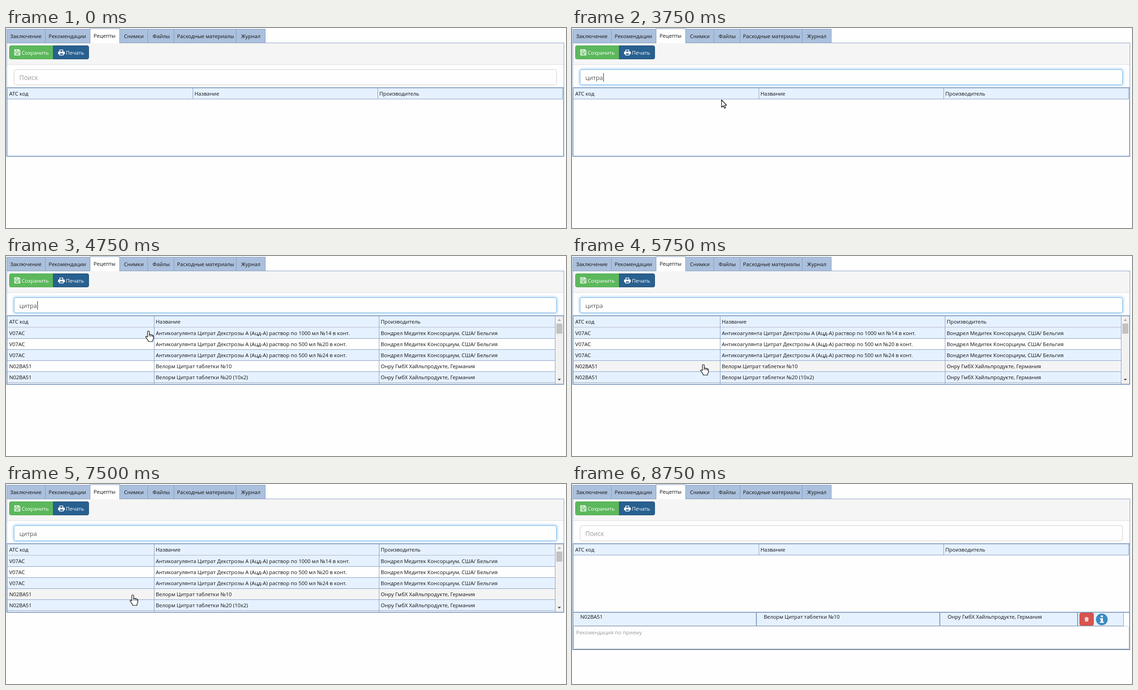
Recreate the animation shown at these times as an HTML page. Size 1215 by 435 pixels, loop 9.25 s.

```html
<!DOCTYPE html>
<html lang="ru">
<head>
<meta charset="utf-8">
<title>Рецепты</title>
<style>
html, body { margin: 0; width: 100%; height: 100%; overflow: hidden; background: #fefefe; }
svg { display: block; width: 1215px; height: 435px; }
text { font-family: "Open Sans", "Noto Sans", sans-serif; white-space: pre; }
</style>
</head>
<body>
<svg id="stage" viewBox="0 0 1215 435"></svg>
<script>
const LOOP = 9250, STEP = 250;
const LINE = '#839dc1', BLUE = '#e6f1ff', WHITE = '#fefefe', HOVER = '#f4f4f4';
const stage = document.getElementById('stage');

function add(parent, tag, attrs, content) {
  const el = document.createElementNS('http://www.w3.org/2000/svg', tag);
  for (const k in attrs) el.setAttribute(k, attrs[k]);
  if (content) el.textContent = content;
  parent.appendChild(el);
  return el;
}
const group = (parent = stage) => add(parent, 'g', {});
const box = (p, x1, y1, x2, y2, fill, extra) =>
  add(p, 'rect', { x: x1, y: y1, width: x2 - x1, height: y2 - y1, fill, ...extra });
const outline = (p, x1, y1, x2, y2, stroke, fill = 'none', rx = 0) =>
  box(p, x1 + .5, y1 + .5, x2 - .5, y2 - .5, fill, { stroke, rx });
const label = (p, x, y, s, size = 11.35, fill = '#111') =>
  add(p, 'text', { x, y, 'font-size': size, fill }, s);
const path = (p, d, fill, extra) => add(p, 'path', { d, fill, ...extra });
const show = (el, on) => el.setAttribute('visibility', on ? 'inherit' : 'hidden');

// Panel, toolbar and tabs
const base = group();
box(base, 2, 33, 1210, 79, '#f5f5f5');
box(base, 2, 79, 1210, 80, '#dddddd');
box(base, 1, 32, 1211, 33, LINE);
box(base, 1, 32, 2, 130, LINE);
box(base, 1210, 32, 1211, 130, LINE);

const tabs = [
  [1, 'Заключение', 9], [85, 'Рекомендации', 92.5], [182, 'Рецепты', 190], [246, 'Снимки', 256],
  [307, 'Файлы', 318], [364, 'Расходные материалы', 371], [499, 'Журнал', 510], [562]
];
tabs.slice(0, -1).forEach(([x, name, tx], i) => {
  const active = i === 2;
  outline(base, x, active ? 1 : 2, tabs[i + 1][0] + 1, 33, LINE, active ? WHITE : '#abc0dc');
  if (active) box(base, x + 1, 32, tabs[i + 1][0], 33, WHITE);
  label(base, tx, active ? 21 : 22, name, 11.25);
});

path(base, 'M11 38.5H102.5V67.5H11Q7.5 67.5 7.5 64V42Q7.5 38.5 11 38.5Z', '#5cb85c', { stroke: '#4cae4c' });
path(base, 'M102.5 38.5H176Q179.5 38.5 179.5 42V64Q179.5 67.5 176 67.5H102.5Z', '#286090', { stroke: '#204d74' });
label(base, 34, 58, 'Сохранить', 11.25, '#fff');
label(base, 130, 58, 'Печать', 11.25, '#fff');
path(base, 'M18.7 47.2H28L30.3 49.5V58.8H18.7ZM21 47V51H27.5V47M21 59V54.2H28V59',
  'none', { stroke: '#fff', 'stroke-width': 1.4 });
box(base, 25, 47, 27, 50, '#fff');
path(base, 'M116 47H124V51H126Q127.5 51 127.5 52.5V57H125V59.5H115.5V57H113V52.5Q113 51 114.5 51H116Z', '#fff');
box(base, 117.5, 48.3, 122.5, 51.5, '#286090');
box(base, 117, 55.3, 123.5, 58, '#286090');

// Search field
const glow = group();
for (let i = 1; i < 6; i++)
  add(glow, 'rect', {
    x: 17.5 - i, y: 90.5 - i, width: 1177 + 2 * i, height: 33 + 2 * i, rx: 4 + i,
    fill: 'none', stroke: '#66afe9', 'stroke-opacity': .36 - i * .06
  });
const field = outline(stage, 17, 90, 1195, 124, '#cccccc', WHITE, 4);
const hint = label(stage, 29, 113, 'Поиск', 13.6, '#999');
const query = label(stage, 29, 113, '', 13.2, '#555');
const caret = box(stage, 0, 98, 1, 117, '#222');

const titles = ['АТС код', 'Название', 'Производитель'];
function header(p, cols) {
  box(p, cols[0], 131, cols[3], 155, BLUE);
  titles.forEach((s, i) => label(p, cols[i] + (i ? 4 : 4), 147, s));
}

// Empty list
const empty = group();
header(empty, [3, 405, 806, 1208]);
box(empty, 3, 154, 1208, 155, LINE);
for (const x of [405, 806, 1207]) box(empty, x, 131, x + 1, 155, LINE);

// Found list
const found = group();
const cols = [3, 321, 809, 1191];
header(found, cols);
const solution = s => 'Антикоагулянта Цитрат Декстрозы А (Ацд-А) раствор по ' + s + ' в конт.';
const makerA = 'Вондрел Медитек Консорциум, США/ Бельгия';
const makerB = 'Онру ГмбХ Хайльпродукте, Германия';
const drug = 'Велорм Цитрат таблетки №';
const data = [
  ['V07AC', solution('1000 мл №14'), makerA],
  ['V07AC', solution('500 мл №20'), makerA],
  ['V07AC', solution('500 мл №24'), makerA],
  ['N02BA51', drug + '10', makerB],
  ['N02BA51', drug + '20 (10x2)', makerB]
];
const rows = data.map((cells, i) => {
  const y = 156 + 24 * i;
  const back = box(found, 3, y, 1191, y + 23, i % 2 ? WHITE : BLUE);
  box(found, 3, y + 23, 1191, y + 24, LINE);
  cells.forEach((s, c) => label(found, cols[c] + 4, y + 16, s));
  return back;
});
box(found, 3, 154, 1191, 156, '#cbd3de');
for (const x of cols.slice(1)) box(found, x, 131, x + 1, 278, LINE);
box(found, 1192, 131, 1209, 278, '#f1f1f1');
box(found, 1194, 147, 1207, 169, '#c1c1c1');
path(found, 'M1197 141H1204L1200.5 137Z', '#a3a3a3');
path(found, 'M1197 267H1204L1200.5 271Z', '#505050');

const frame = group();
box(frame, 2, 129, 1211, 131, LINE);
box(frame, 1, 129, 3, 280, LINE);
box(frame, 1209, 129, 1211, 280, LINE);
box(frame, 2, 278, 1211, 280, LINE);

// Chosen medicine
const chosen = group();
box(chosen, 3, 280, 1197, 308, BLUE);
box(chosen, 3, 308, 1197, 309, LINE);
for (const x of [399, 797, 1096]) box(chosen, x, 279, x + 2, 309, LINE);
box(chosen, 1196, 279, 1197, 309, LINE);
[[18, 0], [416, 1], [815, 2]].forEach(([x, c]) => label(chosen, x, 293, data[3][c]));
outline(chosen, 1101, 280, 1132, 308, '#d43f3a', '#d9534f', 3);
path(chosen, 'M1112 291H1121V292.4H1112ZM1114.8 289.5H1118.2V291H1114.8ZM1112.8 293H1120.2L1119.7 299H1113.3Z', '#fff');
for (const x of [1114.6, 1116.2, 1117.8]) box(chosen, x, 294, x + .6, 298, '#d9534f');
add(chosen, 'circle', { cx: 1149.5, cy: 294.5, r: 12.7, fill: '#3a8bc4' });
path(chosen, 'M1147.3 286H1152V289.8H1147.3ZM1145.5 292H1152V299.7H1154V302H1145.3V299.7H1147.3V294.3H1145.5Z', '#fff');
outline(chosen, 3, 309, 1209, 359, '#cccccc', WHITE, 3);
label(chosen, 9, 327, 'Рекомендация по приему', 11.35, '#999');
box(chosen, 1, 280, 3, 361, LINE);
box(chosen, 1209, 280, 1211, 361, LINE);
box(chosen, 1, 359, 1211, 361, '#7187a6');

// Pointers, each with its hot spot at 0,0
const pen = { stroke: '#000', 'stroke-width': 1.2, 'stroke-linejoin': 'round' };
const pointers = {
  beam: path(stage, 'M-3 -8H-1L0 -7L1 -8H3M0 -7V7M-3 8H-1L0 7L1 8H3', 'none', { stroke: '#444' }),
  arrow: path(stage, 'M.5 .5V16.5L4.3 13L6.8 18.6L9.3 17.5L6.9 12H11.5Z', '#fff', pen),
  hand: path(stage, 'M-2 13V2A2 2 0 0 1 2 2V8Q4.5 7 5.5 8.8Q8 7.8 9 9.6Q11 9.1 11 11.6V15.6Q11 18.6 9 20.6V23H0Q-1 19.5 -3 17.5L-6 13.5Q-5.5 10.5 -2 13ZM2 8V12M5.5 9V12.5M9 10V13', '#fff', pen)
};
const moves = [
  [0], [250, 'beam', 234, 117], [750, 'arrow', 290, 141], [1000, 'arrow', 324, 156],
  [4000, 'hand', 324, 156], [4250, 'hand', 317, 159], [4500, 'hand', 311, 162], [4750, 'hand', 309, 163],
  [5000, 'hand', 302, 184], [5250, 'hand', 293, 209], [5500, 'hand', 287, 230], [5750, 'hand', 285, 236],
  [6250, 'hand', 281, 239], [6500, 'hand', 275, 241], [7750, 'arrow', 271, 241],
  [8250, 'arrow', 272, 285], [8500, 'arrow', 276, 375], [8750]
];
const typing = [[0, '', 30], [1750, 'ц', 38], [2000, 'ци', 46], [2750, 'цитра', 68]];
const latest = (list, t) => list.filter(k => k[0] <= t).pop();

function caretOn(t) {
  if (t < 1750) return t % 1000 < 500;
  if (t < 2500) return true;
  return (t - 2620 + 1060) % 1060 < 530;
}

function draw(now) {
  const t = Math.floor(now % LOOP / STEP) * STEP;
  const focused = t >= 250 && t < 7750;
  const listed = t >= 4000 && t < 7750;
  const [, word, caretX] = latest(typing, focused ? t : 0);
  show(glow, focused);
  field.setAttribute('stroke', focused ? '#66afe9' : '#cccccc');
  show(hint, !word);
  query.textContent = word;
  caret.setAttribute('x', caretX);
  show(caret, focused && caretOn(t));
  show(empty, !listed);
  show(found, listed);
  show(chosen, t >= 7750);

  const [, kind, x, y] = latest(moves, t);
  for (const k in pointers) show(pointers[k], k === kind);
  if (kind) pointers[kind].setAttribute('transform', `translate(${x} ${y})`);
  const over = Math.floor((y - 156) / 24);
  rows.forEach((r, i) => r.setAttribute('fill', i % 2 ? (i === over ? HOVER : WHITE) : BLUE));
}

const start = performance.now();
function tick() {
  draw(performance.now() - start);
  requestAnimationFrame(tick);
}
tick();
</script>
</body>
</html>
```
